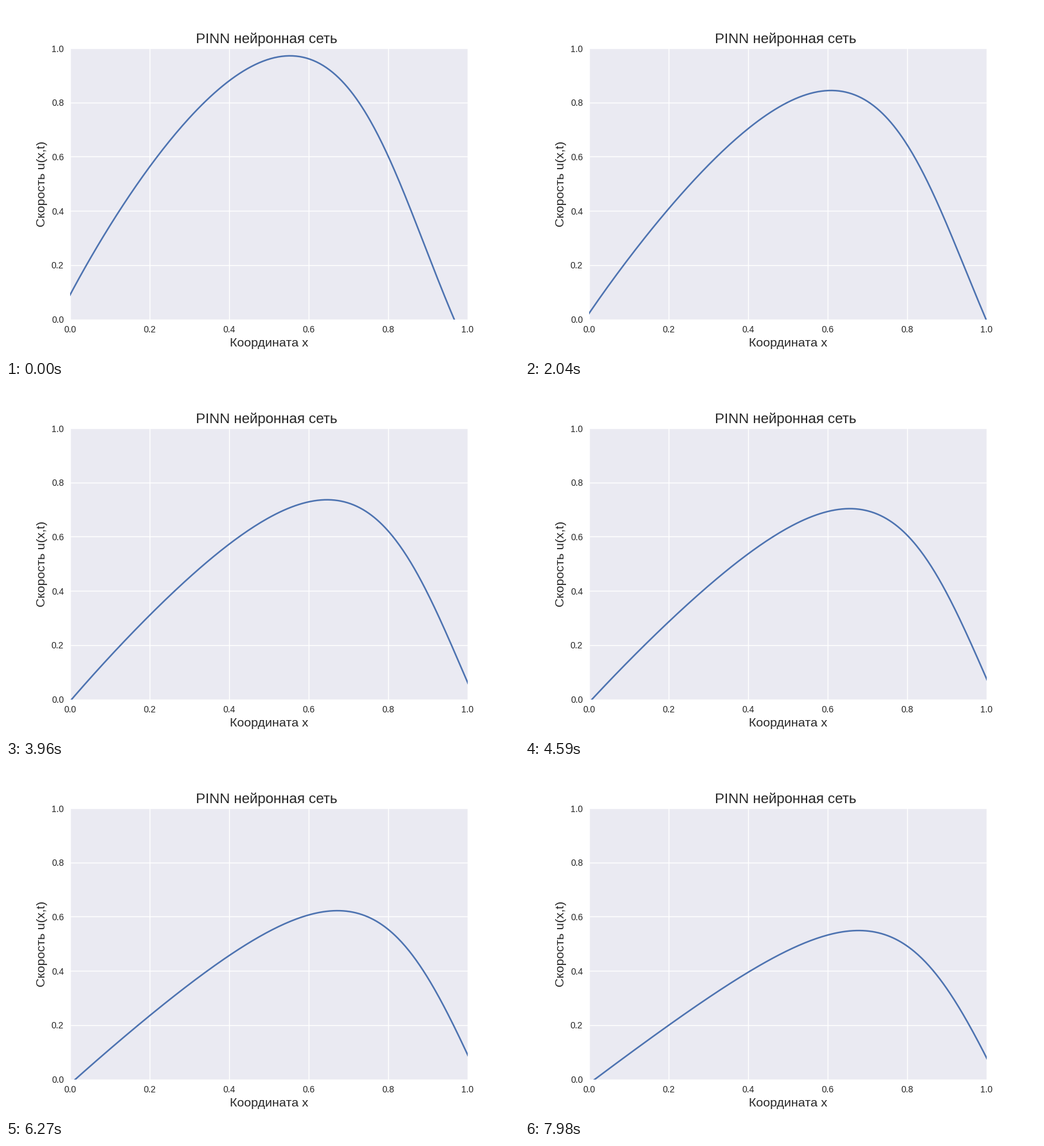
A matplotlib script for the animation above (8 s loop, 800 px wide and 550 px high).

```python
import numpy as np
import matplotlib.pyplot as plt
from matplotlib.animation import FuncAnimation

LOOP = 8000    # ms
INTERVAL = 20  # ms per drawn frame
STEP = 30      # the curve moves once per step, ms

DARK = "0.15"
plt.rcParams.update({
    "font.family": "Liberation Sans",
    "text.color": DARK,
    "axes.labelcolor": DARK,
    "axes.facecolor": "#EAEAF2",
    "axes.edgecolor": "white",
    "axes.linewidth": 0,
    "axes.grid": True,
    "axes.axisbelow": True,
    "grid.color": "white",
    "grid.linestyle": "-",
    "grid.linewidth": 1,
    "lines.solid_capstyle": "round",
})
for axis in ("xtick", "ytick"):
    plt.rcParams.update({
        f"{axis}.color": DARK,
        f"{axis}.labelsize": 10,
        f"{axis}.major.size": 0,
        f"{axis}.major.pad": 7,
    })


def ease(t, start, mid, end):
    """Parabola through its values at t = 0, 0.5 and 1."""
    bend = start - 2 * mid + end
    return start + (end - start) * t - 2 * bend * t * (1 - t)


# s runs along the wave: -1 at its left zero, 0 at the crest, 1 at its right zero
s = np.linspace(-1.06, 1.06, 240)


def wave(t):
    """A cosine arch that sinks and leans to the right."""
    height = ease(t, 0.972, 0.734, 0.548)
    crest = ease(t, 0.553, 0.647, 0.678)
    left = ease(t, -0.032, 0.0042, 0.0145)
    right = ease(t, 0.966, 1.0183, 1.0264)

    half = (right - left) / 2
    lean = crest - (left + right) / 2
    widen = ease(t, 0.008, -0.022, -0.041) + ease(t, 0, 0.02, 0.026) * s**2
    sharpen = ease(t, 0.066, 0.051, 0.033)

    inner = 1 - s**2
    x = crest + s * (half + widen * inner) - s**2 * (lean + sharpen * inner)
    return x, height * np.cos(np.pi / 2 * s)


fig = plt.figure(figsize=(8, 5.5), dpi=100, facecolor="white")
ax = fig.add_axes([0.125, 0.11, 0.775, 0.77])
ax.set(xlim=(0, 1), ylim=(0, 1))
ax.set_title("PINN нейронная сеть", fontsize=16, x=0.4945)
ax.set_xlabel("Координата x", fontsize=14)
ax.set_ylabel("Скорость u(x,t)", fontsize=14)
line, = ax.plot(*wave(0), color="#4C72B0", lw=1.75)


def update(i):
    ms = (i * INTERVAL + INTERVAL // 2) // STEP * STEP
    line.set_data(*wave(ms / LOOP))
    return line,


anim = FuncAnimation(fig, update, frames=LOOP // INTERVAL, interval=INTERVAL,
                     repeat=True, repeat_delay=0)
plt.show()
```
